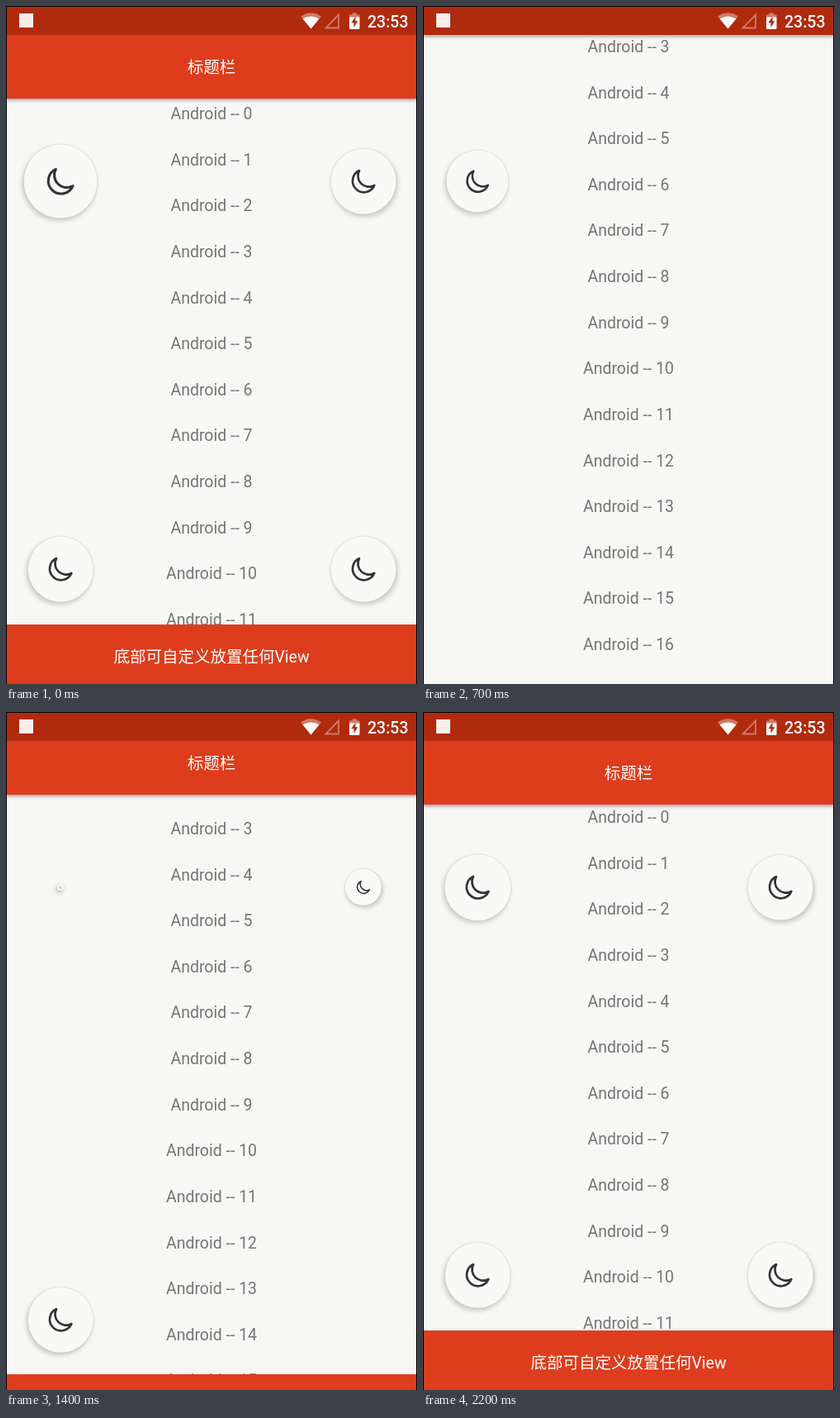
An HTML page for the animation above (2400 ms loop, 498 by 820 pixels).

```html
<!DOCTYPE html>
<html lang="zh-CN">
<head>
<meta charset="utf-8">
<title>滚动联动</title>
<style>
  html, body { margin: 0; width: 100%; height: 100%; overflow: hidden; }
  body {
    position: relative;
    background: #f7f7f5;
    font: 19.5px Roboto, "Noto Sans CJK SC", "Noto Sans CJK", sans-serif;
    color: #757575;
    text-align: center;
  }
  #stage { position: absolute; left: 0; top: 0; width: 498px; height: 820px; overflow: hidden; }
  #list { position: absolute; left: 0; top: 103px; width: 498px; }
  #list div { height: 55.64px; line-height: 55.64px; }
  .bar {
    position: absolute; left: 0; width: 498px; height: 77px; line-height: 79px;
    background: #dd3d1c; color: #fff;
  }
  #head { top: 35px; box-shadow: 0 2px 4px rgba(0, 0, 0, .36); }
  #foot { top: 748px; }
  #status { position: absolute; left: 0; top: 0; width: 498px; height: 35px; background: #b02a0e; }
  #status svg { position: absolute; left: 0; top: 0; }
  #clock {
    position: absolute; left: 438px; top: 0; line-height: 39px;
    color: #fff; font-weight: 500;
  }
  .fab {
    position: absolute;
    width: calc(2 * var(--r)); height: calc(2 * var(--r));
    transform: translate(-50%, -50%);
    border-radius: 50%;
    background: #f9f9f8;
    box-shadow: var(--dx) 3px 5px 1px rgba(0, 0, 0, .16), 0 0 2px rgba(0, 0, 0, .16);
  }
  .fab svg { display: block; width: 100%; height: 100%; }
  #edge {
    position: absolute; inset: 0;
    border: solid #000; border-width: 1px 1px 0;
  }
</style>
</head>
<body>
<div id="stage">
  <div id="list"></div>
  <div id="head" class="bar">标题栏</div>
  <div id="foot" class="bar">底部可自定义放置任何View</div>
  <div id="status">
    <svg width="498" height="35">
      <rect x="16" y="9" width="17" height="17" fill="#fbeeea"/>
      <path d="M369.5 27.5 L357 12.5 Q369.5 4 382 12.5Z" fill="#fff" opacity=".38"/>
      <path d="M369.5 27.5 L359.6 15.6 Q369.5 9.6 379.4 15.6Z" fill="#fff"/>
      <path d="M387.5 26.5 H403 V10.5Z" fill="none" stroke="#fff" stroke-width="1.8" opacity=".38"/>
      <path d="M416 14 V10.5 H419.5 V8.5 H425 V10.5 H428.5 V14Z" fill="#fff" opacity=".4"/>
      <rect x="416" y="13.5" width="12.5" height="14.5" rx="1" fill="#fff"/>
      <path d="M423.6 12.5 L418.4 20.2 H421.5 V26 L426.3 18.3 H423.4Z" fill="#b02a0e"/>
    </svg>
    <div id="clock">23:53</div>
  </div>
  <div id="edge"></div>
</div>
<script>
  const LOOP = 2400, STEP = 100;
  const LEFT = 66, RIGHT = 433, HIGH = 212, LOW = 681, RADIUS = 39.3;
  const get = id => document.getElementById(id);
  const stage = get('stage'), list = get('list'), head = get('head'), foot = get('foot');

  for (let i = 0; i < 20; i++) {
    const row = document.createElement('div');
    row.textContent = `Android -- ${i}`;
    list.append(row);
  }

  const smooth = p => (1 - Math.cos(Math.PI * p)) / 2;
  const accelerate = p => p * p;
  const anticipate = (p, pull = 2) => p * p * ((pull + 1) * p - pull);
  const overshoot = p => 1 - anticipate(1 - p);
  const lurch = p => p < .5
    ? anticipate(2 * p, 3) / 2
    : 1 - anticipate(2 - 2 * p, 3) / 2;

  const ramp = (t, start, time) => Math.min(1, Math.max(0, (t - start) / time));

  // 0 in place, 1 gone; leaves at `out` and comes back at `back`.
  const away = (t, ease, out, back, time) =>
    ease(ramp(t, out, time)) - ease(ramp(t, back, time));

  const scrollAt = t =>
    248 * smooth(ramp(t, 105, 505)) - 244.5 * accelerate(ramp(t, 761, 1040));

  // The first button is still settling from its last appearance when the loop begins.
  const popAt = t => overshoot(ramp(t, -390, 700))
    - anticipate(ramp(t, 150, 790)) + overshoot(ramp(t, 1560, 700));

  const still = value => () => value;
  const fabs = [
    { x: LEFT, y: still(HIGH), r: t => Math.max(4, RADIUS * popAt(t)) },
    { x: RIGHT, y: still(HIGH), r: t => RADIUS * (1 - away(t, smooth, 248, 1200, 370)) },
    { x: LEFT, y: t => LOW + 180 * away(t, smooth, 137, 1121, 442), r: still(RADIUS) },
    { x: RIGHT, y: t => LOW + 180 * away(t, lurch, 239, 1180, 610), r: still(RADIUS) }
  ];

  for (const fab of fabs) {
    const el = fab.el = document.createElement('div');
    el.className = 'fab';
    el.style.left = fab.x + 'px';
    el.style.setProperty('--dx', fab.x === LEFT ? '-1.5px' : '1.5px');
    el.innerHTML = `<svg viewBox="-39.5 -39.5 79 79">
      <path d="M-5 -13 A13.8 13.8 0 1 0 13.4 5 A13.4 13.4 0 0 1 -5 -13Z"
        fill="none" stroke="#333" stroke-width="2.7" stroke-linejoin="round"/></svg>`;
    stage.insertBefore(el, get('status'));
  }

  const shift = (el, y) => { el.style.transform = `translateY(${y}px)`; };

  function draw(t) {
    shift(list, -scrollAt(t));
    shift(head, -77 * away(t, smooth, 179, 1079, 433));
    shift(foot, 77 * away(t, accelerate, 111, 1090, 554));
    for (const { el, y, r } of fabs) {
      const size = r(t);
      el.style.display = size > .5 ? 'block' : 'none';
      el.style.top = y(t) + 'px';
      el.style.setProperty('--r', size + 'px');
    }
  }

  const start = performance.now();
  function tick() {
    const t = (performance.now() - start) % LOOP;
    draw(Math.floor(t / STEP) * STEP);
    requestAnimationFrame(tick);
  }
  tick();
</script>
</body>
</html>
```
